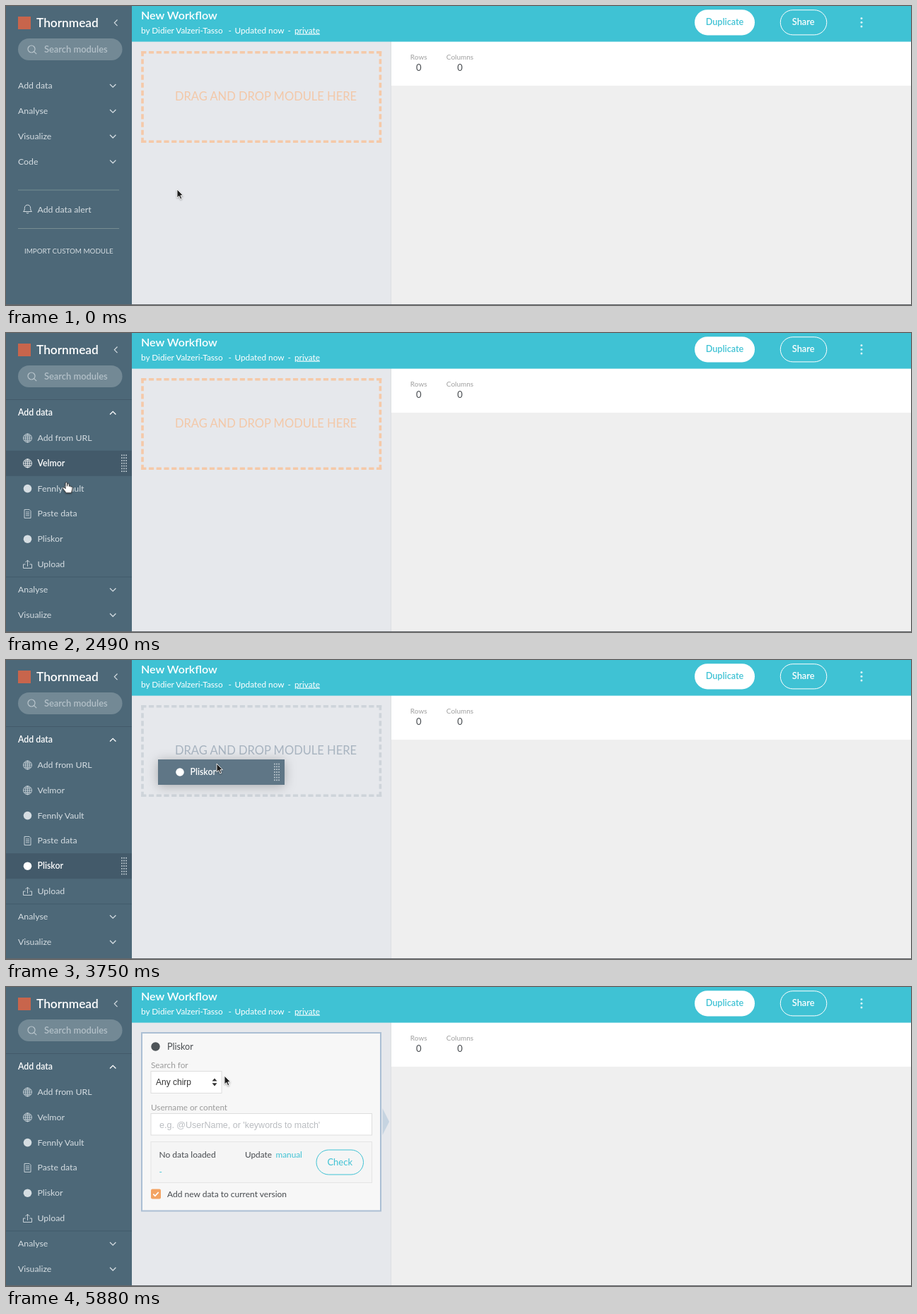
Animation, 1280 px wide and 424 px high, one loop 5910 ms. Source, as an HTML page:

```html
<!DOCTYPE html>
<html lang="en">
<head>
<meta charset="utf-8">
<title>Workflow editor</title>
<style>
html, body { margin: 0; width: 100%; height: 100%; overflow: hidden; background: #efefef; }
svg { display: block; width: 1280px; height: 424px; font-family: Lato, "Open Sans", sans-serif; }
text { white-space: pre; }
</style>
</head>
<body>
<svg id="stage" viewBox="0 0 1280 424"></svg>
<script>
const LOOP = 5910, OPEN = 1286, GRAB = 3450, DROP = 4080, READY = 4950;
const ROW = 35.8, FIRST = 131, PANEL = 215;
const SIDE = '#4d6878', DARK = '#435a6a', PALE = '#d5dde2', TEAL = '#3fc2d4', INK = '#474b4f';
const stage = document.getElementById('stage');

const text = (x, y, s, size, fill, more = '') =>
  `<text x="${x}" y="${y}" font-size="${size}" fill="${fill}" ${more}>${s}</text>`;
const rect = (x, y, w, h, fill, more = '') =>
  `<rect x="${x}" y="${y}" width="${w}" height="${h}" fill="${fill}" ${more}/>`;
const line = (d, color, width = 1, more = '') =>
  `<path d="${d}" fill="none" stroke="${color}" stroke-width="${width}" ${more}/>`;
const dot = (x, y, r, fill) => `<circle cx="${x}" cy="${y}" r="${r}" fill="${fill}"/>`;
const at = (x, y, body) => `<g transform="translate(${x} ${y})">${body}</g>`;
const MID = 'text-anchor="middle"', BOLD = 'font-weight="600"';
const border = c => `stroke="${c}"`;

// Icons, centred on 0,0
const icons = {
  globe: c => line('M-6 0a6 6 0 1 0 12 0a6 6 0 1 0-12 0M-2.8 0a2.8 6 0 1 0 5.6 0a2.8 6 0 1 0-5.6 0M-6 0H6M0-6V6M-5-3H5M-5 3H5', c, .8),
  disc: c => dot(0, 0, 5.8, c),
  file: c => line('M-4.5-6H2.5L4.5-4V6H-4.5ZM-2.5-2.5H2.5M-2.5 0H2.5M-2.5 2.5H2.5', c, .9),
  upload: c => line('M-3 0H-6V5.5H6V0H3M0 3V-5.5M-3-2.8L0-5.8L3-2.8', c, .9),
  bell: c => line('M-6 3.5C-4 2-4.2 0-4.2-1.5C-4.2-7.3 4.2-7.3 4.2-1.5C4.2 0 4 2 6 3.5ZM-1.6 5.2Q0 6.8 1.6 5.2', c, 1)
};
const modules = [
  ['Add from URL', 'globe'], ['Velmor', 'globe'], ['Fennly Vault', 'disc'],
  ['Paste data', 'file'], ['Pliskor', 'disc'], ['Upload', 'upload']
];
const PICK = 4;

// Pointer stops: time, x, y
const stops = [
  [0, 242, 260], [300, 242, 260], [1130, 126, 103], [2000, 126, 103], [2300, 88, 125],
  [2660, 83, 284], [GRAB, 83, 284], [3750, 298, 147], [3930, 309, 126], [LOOP, 309, 126]
];
function pointer(t) {
  const i = Math.max(1, stops.findIndex(s => s[0] >= t));
  const [t0, x0, y0] = stops[i - 1], [t1, x1, y1] = stops[i];
  const u = Math.max(0, (t - t0) / (t1 - t0)), k = u * u * (3 - 2 * u);
  return [x0 + (x1 - x0) * k, y0 + (y1 - y0) * k];
}

function grip(x, y) {
  let s = '';
  for (let i = 0; i < 21; i++) s += rect(x - 4 + i % 3 * 3.1, y - 12.3 + (i / 3 | 0) * 3.8, 1.7, 1.7, '#c0cbd2');
  return s;
}

function moduleRow(i, lit) {
  const [name, icon] = modules[i], y = FIRST + ROW * i, c = lit ? '#fff' : PALE;
  return (lit ? rect(0, y, 178, 36, DARK) + grip(167, y + 18) : '') +
    at(30.5, y + 18, icons[icon](c)) + text(44.5, y + 22, name, 12.3, c, lit ? BOLD : '');
}

function heading(y, name, lit, open) {
  const c = lit || open ? '#fff' : PALE;
  return (lit ? rect(0, y - 18, 178, 36, DARK) : '') +
    text(17, y + 4.3, name, 12.3, c, open ? BOLD : '') +
    line(open ? `M147 ${y + 2.5}l4.2-4.2 4.2 4.2` : `M147 ${y - 2}l4.2 4.2 4.2-4.2`, c, 1.3);
}

function sidebar(t, dragging) {
  const u = Math.min(1, Math.max(0, (t - OPEN) / 300));
  const h = PANEL * (1 - (1 - u) ** 2), open = t >= OPEN;
  const [hx, hy] = pointer(Math.max(0, t - 45));
  const over = (y, tall) => !dragging && hx < 178 && hy >= y && hy < y + tall;
  let s = rect(0, 0, 178, 424, SIDE) +
    rect(17, 15, 18, 18, '#c8654c') + text(43, 30, 'Thornmead', 17.3, '#fff', BOLD) +
    line('M157.5 19.5l-4.2 4.3 4.2 4.3', PALE, 1.2) +
    rect(17, 46, 147.5, 31, '#738995', 'rx="15.5"') +
    line('M31 61a5 5 0 1 0 10 0a5 5 0 1 0-10 0M39.6 64.6l3.6 3.6', '#b9c5cc', 1.2) +
    text(54, 65.7, 'Search modules', 12.9, '#b3c0c8', BOLD);
  s += heading(113, 'Add data', over(95, 36), open);
  if (open) {
    s += rect(0, 94, 178, 1, DARK) + `<clipPath id="fold">${rect(0, FIRST, 178, h, '#000')}</clipPath><g clip-path="url(#fold)">`;
    modules.forEach((m, i) => s += moduleRow(i, dragging ? i === PICK : over(FIRST + ROW * i, ROW)));
    s += '</g>' + rect(0, FIRST + h - .5, 178, 1, DARK);
  }
  ['Analyse', 'Visualize', 'Code'].forEach((name, i) => {
    const y = 149 + h + ROW * i;
    s += heading(y, name, over(y - 18, ROW));
  });
  return s + at(0, h,
    rect(17, 260.5, 143, 1, '#778d92') + rect(17, 315, 143, 1, '#778d92') +
    at(30.5, 288, icons.bell(PALE)) + text(44.5, 292.5, 'Add data alert', 12.3, PALE) +
    text(26, 350.7, 'IMPORT CUSTOM MODULE', 9.8, PALE));
}

function header(late) {
  const x = late ? 425 : 408;
  return rect(178, 0, 1102, 50.6, TEAL) +
    text(191, 18.7, 'New Workflow', 16.1, '#fff', BOLD) +
    text(191, 38.5, 'by Didier Valzeri-Tasso', 11.8, '#fff') + text(314.5, 38.5, '-', 11.8, '#fff') +
    text(323.5, 38.5, late ? 'Updated 1m ago' : 'Updated now', 11.8, '#fff') +
    text(x - 9.5, 38.5, '-', 11.8, '#fff') + text(x, 38.5, 'private', 11.8, '#fff', 'text-decoration="underline"') +
    rect(974, 5.2, 85, 36.2, '#fff', 'rx="18.1"') + text(1016.5, 27.3, 'Duplicate', 12.6, TEAL, MID + ' ' + BOLD) +
    rect(1095.3, 5.7, 65.5, 35.2, 'none', 'rx="17.6" ' + border('#fff')) +
    text(1127.7, 27.3, 'Share', 12.8, '#fff', MID + ' ' + BOLD) +
    [17.5, 23.3, 29].map(y => dot(1210, y, 1.5, '#d8f3f6')).join('');
}

function table() {
  return rect(544, 50, 736, 374, '#efefef') + rect(544, 50, 736, 63, '#fff') + rect(544, 50, 1, 374, '#dcdee1') +
    text(583.7, 76, 'Rows', 10, '#a0a0a0', MID) + text(642, 76, 'Columns', 10, '#a0a0a0', MID) +
    text(583.7, 92, '0', 13, INK, MID) + text(642, 92, '0', 13, INK, MID);
}

// Each side starts and ends on a full dash
function dashedBox(x, y, w, h, color) {
  const thick = 3.6, dash = 2 * thick, half = thick / 2;
  const side = (d, len) => {
    const gaps = Math.round((len - dash) / (dash + thick));
    return line(d, color, thick, `stroke-dasharray="${dash} ${(len - dash) / gaps - dash}"`);
  };
  return side(`M${x} ${y + half}h${w}`, w) + side(`M${x} ${y + h - half}h${w}`, w) +
    side(`M${x + half} ${y}v${h}`, h) + side(`M${x + w - half} ${y}v${h}`, h);
}

function dropZone(busy) {
  return dashedBox(191.2, 64, 340, 130, busy ? '#ced4da' : '#f5c9a8') +
    text(367.5, 134.3, 'DRAG AND DROP MODULE HERE', 16.5, busy ? '#a8b4c0' : '#f3c8a8', MID);
}

function card() {
  const grey = '#9b9b9b';
  return rect(192, 65, 338, 252.5, '#f7f7f7', 'stroke="#abbfd4" stroke-width="2"') +
    '<path d="M532.5 172l9.5 19-9.5 19z" fill="#c6d4e1"/>' +
    dot(211.5, 84.5, 6.2, '#4f5559') + text(228, 88.7, 'Pliskor', 12.6, INK) +
    text(205, 114.7, 'Search for', 11.8, grey) +
    rect(205, 119.5, 100, 31, '#fff', border('#dedede')) +
    text(212, 139, 'Any chirp', 12, '#333', 'font-family="Liberation Sans, Arial, sans-serif"') +
    '<path d="M291.5 133.6l3.5-4.2 3.5 4.2zM291.5 136.2l3.5 4.2 3.5-4.2z" fill="#333"/>' +
    text(205, 174.7, 'Username or content', 11.7, grey) +
    rect(205, 179.5, 312.5, 30.5, '#fff', border('#dedede')) +
    text(217, 199.5, "e.g. @UserName, or 'keywords to match'", 12.5, '#b9bcc0', 'font-family="Liberation Sans, Arial, sans-serif"') +
    rect(205, 219.5, 312.5, 58, '#f5f5f5', border('#e5e5e5')) +
    text(216.5, 241.7, 'No data loaded', 12, INK) + text(338, 241.7, 'Update', 11.8, INK) +
    text(381.5, 241.7, 'manual', 11.8, TEAL) + text(216.5, 265.5, '-', 11.8, TEAL) +
    rect(439, 231, 66.5, 35, 'none', 'rx="17.5" ' + border(TEAL)) + text(472.2, 252.7, 'Check', 13, TEAL, MID) +
    rect(205, 286.5, 14, 14, '#f3a362', 'rx="2"') + line('M208.3 293.7l2.6 2.6 4.8-5.3', '#fff', 1.8) +
    text(228, 298, 'Add new data to current version', 12, INK);
}

function dragged(x, y) {
  const [name, icon] = modules[PICK];
  return at(x - 83, y - 6,
    rect(0, 0, 179, 36, '#5f7686', 'style="filter:drop-shadow(0 2px 8px #0004)"') +
    at(31, 18, icons[icon]('#fff')) + text(45.5, 22, name, 12.3, '#fff', BOLD) + grip(168, 18));
}

function cursor(x, y, hand) {
  const d = hand
    ? 'M-1.2 1.2C-1.2-.6 1.2-.6 1.2 1.2V5.5C2-.1 4-.1 4 5.8C5 4.7 6.4 5 6.4 6.5C7.6 5.8 8.6 6.4 8.6 7.8C8.6 11 7.5 12 7.2 15H-.5C-1.2 12.6-3.8 10.5-4.8 8.6C-5.3 7-3.4 6.5-2.4 7.6L-1.2 9Z'
    : 'M0 0V12L2.8 9.5L4.8 14L6.8 13.1L4.9 8.7H8.5Z';
  const look = hand ? ['#fff', '#333'] : ['#1c1c1c', '#fff'];
  return at(x, y, `<path d="${d}" fill="${look[0]}" stroke="${look[1]}" stroke-width=".9" style="filter:drop-shadow(0 1px 1px #0005)"/>`);
}

function draw(t) {
  const [x, y] = pointer(t), dragging = t >= GRAB && t < DROP;
  stage.innerHTML = rect(178, 50, 366, 374, '#e6e8ec') + table() +
    header(t >= DROP && t < READY) + sidebar(t, dragging) + rect(0, 423, 1280, 1, '#63666a') +
    (t < READY ? dropZone(dragging && x > 200) : card()) +
    (dragging ? dragged(x, y) : '') +
    cursor(x, y, !dragging && x < 178 && y > 94);
}

function tick() {
  draw(performance.now() % LOOP);
  requestAnimationFrame(tick);
}
tick();
</script>
</body>
</html>
```
